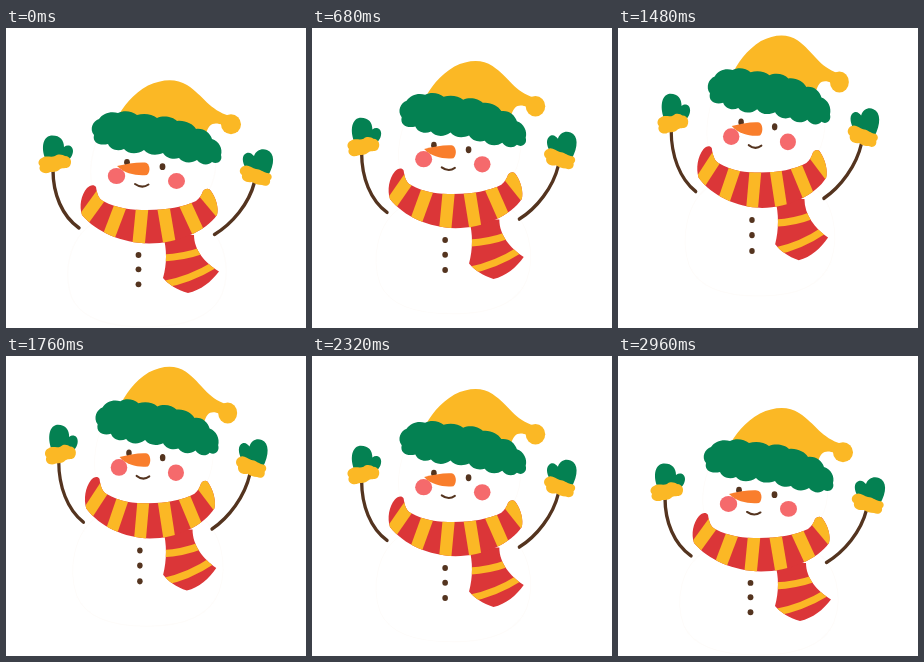
Write an HTML page that moves like this. It is 300 px wide and 300 px high and loops after 3000 ms.

```html
<!DOCTYPE html>
<html lang="en">
<head>
<meta charset="utf-8">
<title>Bouncing snowman</title>
<style>
html, body { margin: 0; width: 100%; height: 100%; overflow: hidden; background: #fff; }
svg { display: block; width: 100vw; height: 100vh; }
.red { fill: #db3638; }
.yellow { fill: #fbb825; }
.green { fill: #048152; }
.pink { fill: #f56a6c; }
.dark { fill: #54341f; }
.snow { fill: #fff; stroke: #fefcfa; }
.line { fill: none; stroke: #54341f; stroke-linecap: round; }
.bands { fill: none; stroke: #fbb825; }
</style>
</head>
<body>
<svg viewBox="0 0 300 300">
  <defs>
    <path id="wrap" d="M81 160 C84 157 88 156 90 159 C91 166 93 171 97 173 C112 181 126 182 141 182 C160 182 178 179 190 173 C194 170 196 166 197 163 C200 160 203 160 205 163 C210 170 213 180 211 187 C200 203 172 215.500 143 215.500 C116 215 90 204 76 187 C73 178 75 167 81 160Z"/>
    <path id="tail" d="M157 207 L188 207 C188 222 199 235 213 243.500 C205 254 195 262 182 265 C171 262 162 256 157 250 C161 236 161 221 157 207Z"/>
    <clipPath id="wrapClip"><use href="#wrap"/></clipPath>
    <clipPath id="tailClip"><use href="#tail"/></clipPath>
  </defs>
  <g id="snowman">
    <path class="snow" d="M86 196 C64 210 56 244 66 270 C76 292 106 299 140 299 C176 299 206 290 216 266 C226 240 217 208 198 196Z"/>
    <path class="snow" d="M91 112 C82 136 83 158 92 172 C120 192 172 192 198 170 C212 152 212 128 206 112Z"/>

    <path class="line" stroke-width="3.400" d="M47 142 C47 166 56 188 73 200"/>
    <path class="line" stroke-width="3.400" d="M248.500 154 C243 176 226 196 208.500 206.500"/>

    <g id="leftHand">
      <path class="green" d="M40 132 C35 122 36 109 45 107.500 C54 107 58 112 58 119 C62 116 67 118 67 123 C67 128 63 132 60 134Z"/>
      <path class="yellow" d="M36 130 C40 127 45 130 49 128 C53 125 57 127 59 128 C65 128 67 135 63 139 C60 141 56 139 53 142 C49 145 45 143 42 145 C36 146 32 142 34 138 C31 135 33 131 36 130Z"/>
    </g>
    <g id="rightHand">
      <path class="green" d="M241 142 C237 137 235 129 239 126 C243 123 246 126 248 128 C250 122 256 120 261 122 C269 125 269 136 262 148Z"/>
      <path class="yellow" d="M238 138 C242 136 246 140 250 141 C254 141 257 144 261 145 C266 145 267 150 264 152 C265 157 260 159 256 157 C252 157 249 156 246 154 C240 155 235 152 236 147 C232 144 234 139 238 138Z"/>
    </g>

    <ellipse class="dark" cx="121" cy="134.300" rx="2.900" ry="3.400"/>
    <ellipse class="dark" cx="156.500" cy="138.700" rx="2.900" ry="3.400"/>
    <ellipse class="pink" cx="110.500" cy="148" rx="8.700" ry="8"/>
    <ellipse class="pink" cx="170.500" cy="153" rx="8.500" ry="7.900"/>
    <path fill="#f97e2c" d="M111 138 C120 136 131 134 139 134.500 C144 135 145 144 141 147 C131 148 119 146 111 138Z"/>
    <path class="line" stroke-width="2" d="M129 156 Q136 161 142.500 156.500"/>

    <use href="#tail" class="red"/>
    <g clip-path="url(#tailClip)" class="bands" stroke-width="7">
      <path d="M153 230 Q175 230 198 222"/>
      <path d="M154 257 Q182 253 210 236"/>
    </g>
    <use href="#wrap" class="red"/>
    <g id="wrapBands" clip-path="url(#wrapClip)" class="bands" stroke-width="12.500"></g>

    <g class="dark">
      <circle cx="132.500" cy="227" r="2.900"/>
      <circle cx="132.500" cy="241.300" r="2.900"/>
      <circle cx="132.500" cy="256.300" r="2.900"/>
    </g>

    <path class="yellow" d="M110 92 C117 78 127 66 142 57.500 C156 51 170 50 181 57 C198 68 203 82 224 88 L217 97 C208 94 203 95 200 106Z"/>
    <circle class="yellow" cx="225" cy="96.300" r="10"/>
    <path class="green" d="M93 91 C97 85 105 83 112 85 C118 82 126 83 131 87 C138 85 146 86 151 90 C158 87 167 89 171 93 C179 92 187 96 190 101 C198 100 204 105 206 111 C213 113 217 121 215 127 C217 133 211 137 206 134 C202 138 195 137 191 132 C185 136 177 135 173 130 C167 132 160 130 157 125 C150 128 142 127 138 122 C131 127 122 126 118 121 C111 124 104 121 102 116 C94 118 86 115 88 107 C83 101 87 93 93 91Z"/>
  </g>
</svg>
<script>
const LOOP = 3000, STEP = 40, CENTER = 150.5;
const snowman = document.getElementById("snowman");

// The scarf's bands fan out evenly from a point behind the hat.
document.getElementById("wrapBands").innerHTML = Array.from({ length: 6 }, (_, i) =>
  `<path d="M144 150 V230" transform="rotate(${36 - 15.2 * i} 144 100)"/>`
).join("");

function draw(now) {
  const t = Math.floor((now % LOOP) / STEP) * STEP;
  const rise = (1 - Math.cos(2 * Math.PI * t / LOOP)) / 2;
  const sx = 1 - 0.055 * rise;
  const sy = 1 + 0.056 * rise;
  const dx = CENTER * (1 - sx) + 0.5 * rise;
  snowman.setAttribute("transform", `matrix(${sx} 0 0 ${sy} ${dx} ${-47.7 * rise})`);
}

const start = performance.now();
function tick() {
  draw(performance.now() - start);
  requestAnimationFrame(tick);
}
tick();
</script>
</body>
</html>
```
